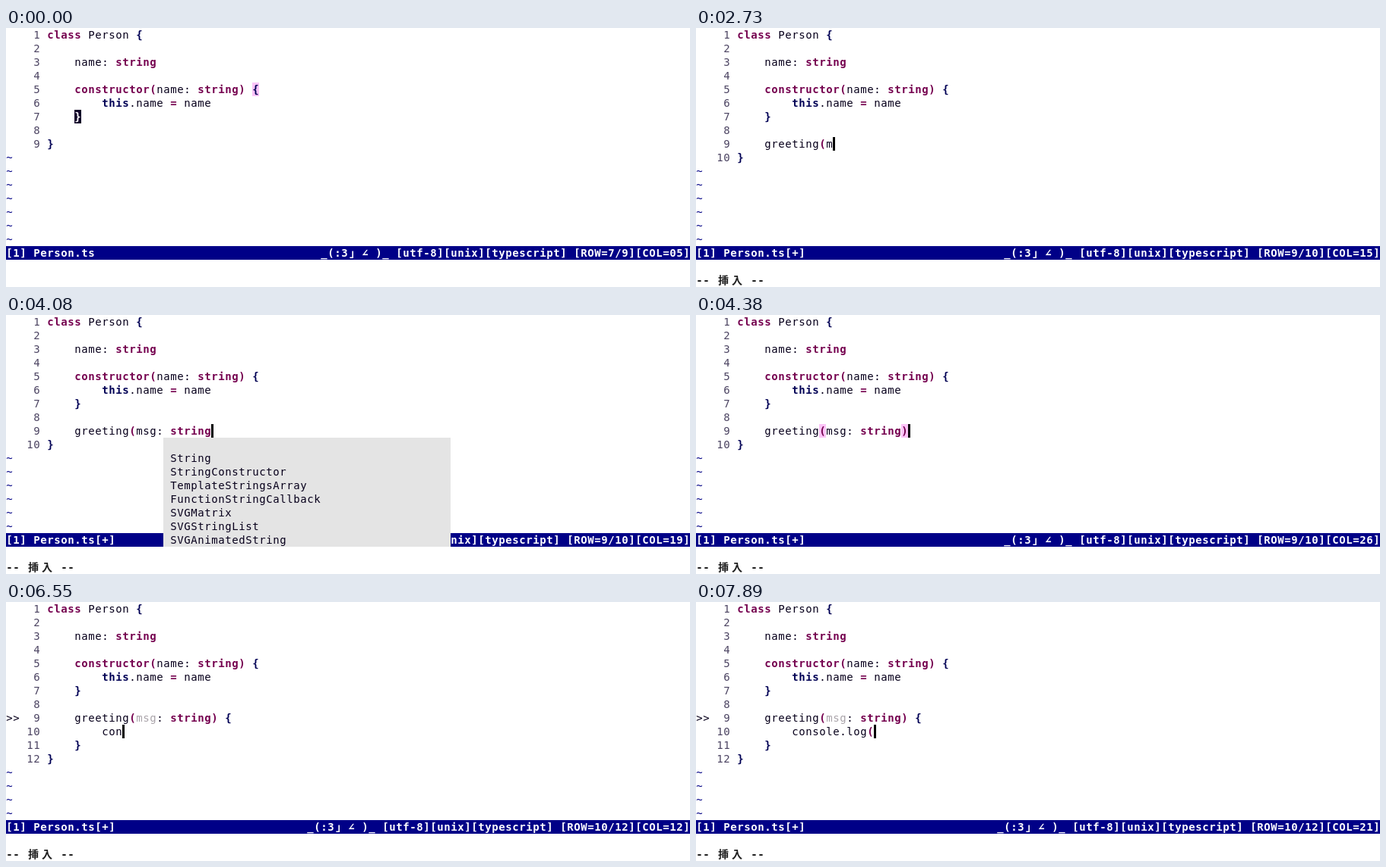
An HTML page with a canvas that plays this animation: 900x342 px, repeating every 8000 ms.

```html
<!DOCTYPE html>
<html lang="en">
<head>
<meta charset="utf-8">
<title>Typing a method in an editor</title>
<style>
html, body { margin: 0; width: 900px; height: 342px; overflow: hidden; background: #fff; }
canvas { display: block; }
</style>
</head>
<body>
<canvas id="stage" width="900" height="342"></canvas>
<script>
const ctx = document.getElementById('stage').getContext('2d');
const W = 9, H = 18, GUTTER = 6, STATUS_ROW = 16, LOOP = 8000;
const FONT = '14px "DejaVu Sans Mono", "Noto Sans Mono", "Noto Sans CJK JP", monospace';
const INK = '#08001c', PURPLE = '#75004f', NAVY = '#000055', BLUE = '#000087',
      PINK = '#fcc4f8', NUMBER = '#4c4462', GRAY = '#aaa4aa';

const HEAD = ['class Person {', '', '    name: string', '', '    constructor(name: string) {',
              '        this.name = name', '    }', ''];
const SIGNATURE = '    greeting(msg: string) {';
const CALL = '        console.log(';
const CLOSE = '    }';

const TYPES = ['', 'String', 'StringConstructor', 'TemplateStringsArray', 'FunctionStringCallback',
               'SVGMatrix', 'SVGStringList', 'SVGAnimatedString'];
const GLOBALS = ['const', 'console', 'continue', 'confirm', 'constructor', 'Console',
                 'ConvolverNode', 'ConstantSourceNode', 'IDBObjectStoreConnection'];
const MEMBERS = ['log', 'clear', 'table', 'timelineEnd', 'timeline', 'profileEnd', 'profile',
                 'groupCollapsed', 'assert'];

// Each step: start time, lines added before the last brace, other state.
const steps = [];
const at = (time, added, state = {}) => steps.push({ time, added, insert: true, row: 8, ...state });

// Types a line letter by letter, starting after `from` characters.
const type = (text, from, times, show) =>
  times.forEach((t, i) => show(t, text.slice(0, from + i + 1)));

const typeSignature = (from, times) => type(SIGNATURE, from, times, (t, s) => at(t, [s]));
const body = (t, s, state) => at(t, [SIGNATURE, s, CLOSE], { row: 9, lint: true, ...state });
const typeCall = (from, times) => type(CALL, from, times, body);
const popup = (items, left, top) => ({ popup: { items, left, top }, col: left + 2 - GUTTER });

at(0, [], { insert: false, row: 6, block: 4, match: [[4, 30]] });
at(250, [], { insert: false, row: 7, block: 0, col: 0 });
at(500, ['    ']);
typeSignature(4, [920, 1110, 1340, 1430, 1560, 1760, 1820, 1890, 2330, 2730, 2850, 2950, 3180, 3250, 3430]);
[3680, 3770, 3860, 3950, 4060].forEach((t, i) => {
  const text = SIGNATURE.slice(0, 20 + i);
  at(t, [text]);
  at(t + (i < 4 ? 30 : 20), [text], popup(TYPES, 23, 9));
});
at(4380, [SIGNATURE.slice(0, 25)], { match: [[8, 12], [8, 24]] });
typeSignature(25, [4540]);
at(4780, [SIGNATURE], { match: [[8, 26], [9, 0]] });
at(5140, [SIGNATURE, '        '], { row: 9 });
at(5390, [SIGNATURE, CLOSE], { row: 9, match: [[8, 26], [9, 4]] });
at(5700, [SIGNATURE, CLOSE], { row: 9, insert: false, block: 4, match: [[8, 26]] });
body(5960, '        ', { lint: false });
body(6140, '        ');
typeCall(8, [6400, 6470, 6550]);
body(6640, CALL.slice(0, 11), popup(GLOBALS, 13, 0));
typeCall(11, [6660, 6700]);
body(6740, CALL.slice(0, 13), popup(['console', 'Console'], 13, 10));
typeCall(13, [6880, 6960, 7140, 7360, 7470]);
body(7510, CALL.slice(0, 18), popup(MEMBERS, 21, 0));
body(7610, CALL.slice(0, 19), popup(['log'], 21, 10));
typeCall(19, [7890]);

function rect(col, row, cols, rows, color) {
  ctx.fillStyle = color;
  ctx.fillRect(col * W, row * H, cols * W, rows * H);
}

// Centres every character in its cell; full-width ones take two.
function text(str, col, row, color = INK, bold = false) {
  ctx.font = (bold ? 'bold ' : '') + FONT;
  ctx.fillStyle = color;
  ctx.textAlign = 'center';
  for (const ch of str) {
    const cells = /[」挿入]/.test(ch) ? 2 : 1;
    if (ch !== ' ') ctx.fillText(ch, (col + cells / 2) * W, row * H + 14);
    col += cells;
  }
}

function code(line, row, lint) {
  const tokens = /\b(?:class|constructor|string)\b|[()=]|\bthis\b|[{}]|\bmsg\b|[^]/g;
  for (const { 0: word, index } of line.matchAll(tokens)) {
    const navy = /^(this|[{}])$/.test(word);
    const purple = /^(class|constructor|string|[()=])$/.test(word);
    const color = navy ? NAVY : purple ? PURPLE : lint && word === 'msg' ? GRAY : INK;
    text(word, GUTTER + index, row, color, navy || purple);
  }
}

function draw(time) {
  const s = steps.findLast(step => step.time <= time);
  const lines = [...HEAD, ...s.added, '}'];
  rect(0, 0, 100, 19, '#fff');

  for (const [row, col] of s.match || []) rect(GUTTER + col, row, 1, 1, PINK);
  lines.forEach((line, row) => {
    text(String(row + 1).padStart(3), 2, row, NUMBER);
    code(line, row, s.lint);
  });
  for (let row = lines.length; row < STATUS_ROW; row++) text('~', 0, row, BLUE);
  if (s.lint) text('>>', 0, 8);

  const cursor = s.insert ? lines[s.row].length : s.block;
  const col = String(s.col ?? cursor + 1).padStart(2, '0');
  const info = `_(:3」∠ )_ [utf-8][unix][typescript] [ROW=${s.row + 1}/${lines.length}][COL=${col}]`;
  rect(0, STATUS_ROW, 100, 1, BLUE);
  text('[1] Person.ts' + (s.added.length ? '[+]' : ''), 0, STATUS_ROW, '#fff', true);
  text(info, 99 - info.length, STATUS_ROW, '#fff', true);
  if (s.insert) text('-- 挿入 --', 0, 18, '#202020', true);

  if (s.popup) {
    const { items, left, top } = s.popup;
    rect(left, top, 42, items.length, '#e4e4e4');
    items.forEach((item, i) => text(item, left + 1, top + i));
  }
  if (s.insert) {
    rect(GUTTER + cursor, s.row, 1 / 3, 1, '#000');
  } else {
    rect(GUTTER + cursor, s.row, 1, 1, '#100028');
    text(lines[s.row][cursor] || '', GUTTER + cursor, s.row, '#fff', true);
  }
}

const start = performance.now();
function tick() {
  draw((performance.now() - start) % LOOP);
  requestAnimationFrame(tick);
}
tick();
</script>
</body>
</html>
```
